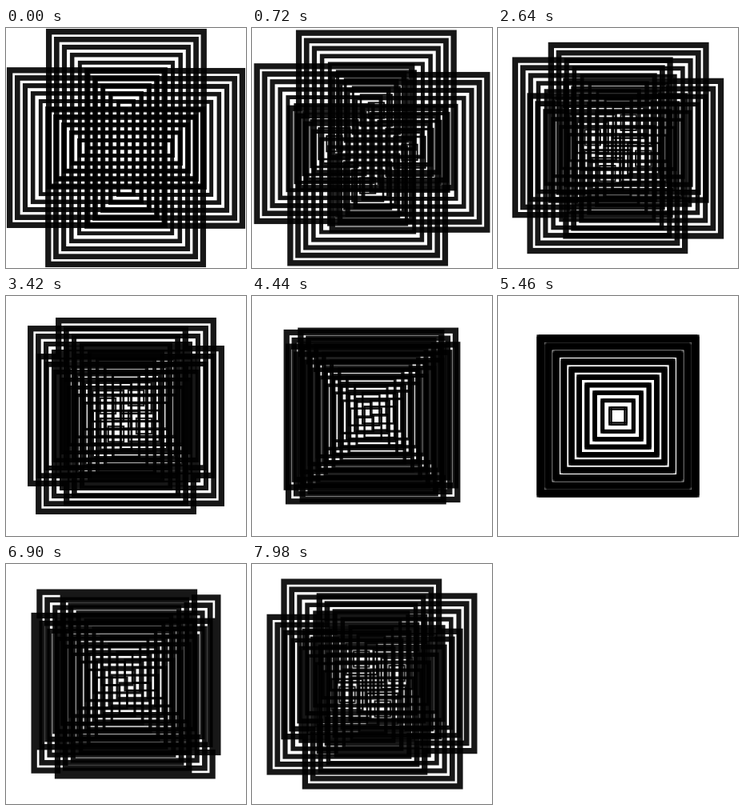
An HTML page that plays this animation: 300 by 300 pixels, repeating every 8 s.

```html
<!DOCTYPE html>
<html lang="en">
<head>
<meta charset="utf-8">
<title>Orbiting squares</title>
<style>
  html, body { margin: 0; width: 100%; height: 100%; overflow: hidden; background: #fff; }
  svg { display: block; width: 100vw; height: 100vh; }
</style>
</head>
<body>
<svg id="stage" viewBox="0 0 300 300"></svg>
<script>
const NS = 'http://www.w3.org/2000/svg';
const LOOP = 8000, STEP = 60;
const RINGS = 10, PITCH = 9.68, REACH = 48.6;
const RAD = Math.PI / 180;
const stage = document.getElementById('stage');

function add(parent, tag, attrs) {
  const el = document.createElementNS(NS, tag);
  for (const key in attrs) el.setAttribute(key, attrs[key]);
  return parent.appendChild(el);
}

// Concentric squares whose lines get heavier towards the outside.
function makeSet() {
  const g = add(stage, 'g', { fill: 'none', stroke: '#000', 'stroke-opacity': 0.91 });
  for (let i = 1; i <= RINGS; i++) {
    const r = i * PITCH;
    add(g, 'rect', {
      x: -r, y: -r, width: 2 * r, height: 2 * r,
      'stroke-width': 1.4 + 0.59 * i
    });
  }
  return g;
}

const sets = Array.from({ length: 4 }, makeSet);

// The four sets turn half a degree per step while their radius swings
// through the centre at one degree per step.
function draw(time) {
  const n = Math.floor((time % LOOP) / STEP) + 1;
  const radius = REACH * Math.cos(n * RAD);
  sets.forEach((g, k) => {
    const a = (n / 2 + k * 90) * RAD;
    const x = 150 + radius * Math.sin(a);
    const y = 150 - radius * Math.cos(a);
    g.setAttribute('transform', `translate(${x.toFixed(3)} ${y.toFixed(3)})`);
  });
}

const start = performance.now();
function tick() {
  draw(performance.now() - start);
  requestAnimationFrame(tick);
}
tick();
</script>
</body>
</html>
```
